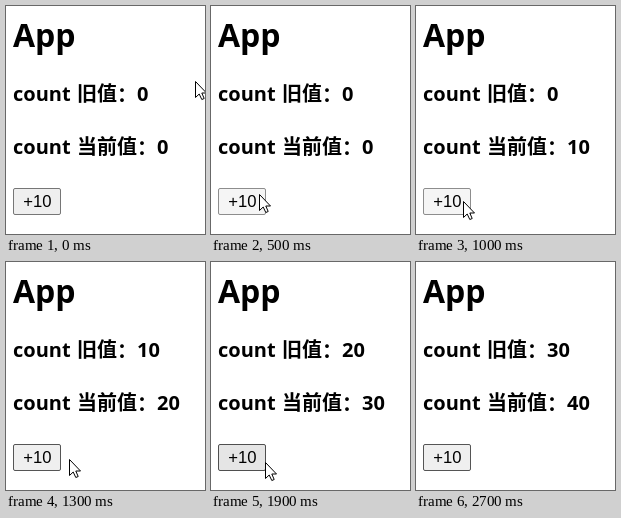
These frames come from a looping animation (199x228 px, 3.1 s). An HTML page:

```html
<!DOCTYPE html>
<html lang="zh-CN">
<head>
<meta charset="utf-8">
<title>App</title>
<style>
  html, body { margin: 0; width: 100%; height: 100%; overflow: hidden; background: #fff; }
  svg { display: block; width: 199px; height: 228px; }
  .head { font: bold 32px "Open Sans", "Noto Sans", sans-serif; }
  .line { font: bold 20px "Open Sans", "Noto Sans", sans-serif; }
  .zh { font-family: "Noto Sans CJK SC", "Noto Sans CJK", sans-serif; }
  .label { font: 16.67px "Liberation Sans", Arial, sans-serif; text-anchor: middle; }
  #button { fill: #efefef; stroke: #767676; }
  #button.focus { stroke: #555; }
  #button.hover { fill: #e5e5e5; stroke: #4f4f4f; }
  #button.press { fill: #f5f5f5; stroke: #8d8d8d; }
</style>
</head>
<body>
<svg viewBox="0 0 199 228">
  <text class="head" x="7" y="41">App</text>
  <g class="line">
    <text x="7" y="95">count</text>
    <text class="zh" x="71" y="95">旧值<tspan dy="1">：</tspan></text>
    <text id="old" x="131" y="95">0</text>
    <text x="7" y="148">count</text>
    <text class="zh" x="71" y="148">当前值<tspan dy="1">：</tspan></text>
    <text id="now" x="151" y="148">0</text>
  </g>
  <rect id="button" x="7.5" y="182.5" width="47" height="26" rx="1.5"/>
  <text class="label" x="31.3" y="201">+10</text>
  <path id="cursor" d="M-.5 .5V16.5L3.2 13L5.8 18.5L8.2 17.5L5.8 12H10.5Z" fill="#fff" stroke="#000"/>
</svg>
<script>
  const LOOP = 3100, TICK = 100, LEAVE = 2700;
  const clicks = [600, 1100, 1700, 2600];
  const [button, cursor, old, now] =
    ['button', 'cursor', 'old', 'now'].map(id => document.getElementById(id));

  // Resting points: time, x, y
  const stops = [
    [0, 190, 75], [500, 49, 188], [700, 72, 193],
    [1300, 64, 197], [1900, 55, 200], [2300, 37, 196]
  ];

  function position(t) {
    const i = stops.findIndex(s => s[0] > t);
    if (i < 0) return stops[stops.length - 1].slice(1);
    const a = stops[i - 1], b = stops[i];
    const k = (t - a[0]) / (b[0] - a[0]);
    // Between the rests beside the button, swing back over it to click
    const swing = t > 700 && t < 1900 ? 20 * Math.sin(Math.PI * k) ** 2 : 0;
    const mix = n => a[n] + (b[n] - a[n]) * k;
    return [Math.round(mix(1) - swing), Math.round(mix(2))];
  }

  function look(t, [x, y]) {
    if (clicks.includes(t + TICK)) return 'press';
    if (t < LEAVE && x <= 55 && y >= 182) return 'hover';
    return t >= clicks[0] ? 'focus' : '';
  }

  function draw(t) {
    const count = 10 * clicks.filter(c => t >= c).length;
    now.textContent = count;
    old.textContent = Math.max(0, count - 10);

    const pos = position(t);
    cursor.setAttribute('transform', `translate(${pos})`);
    cursor.style.display = t < LEAVE ? '' : 'none';
    button.setAttribute('class', look(t, pos));
  }

  const start = performance.now();
  function frame() {
    const t = (performance.now() - start) % LOOP;
    draw(Math.floor(t / TICK) * TICK);
    requestAnimationFrame(frame);
  }
  frame();
</script>
</body>
</html>
```
